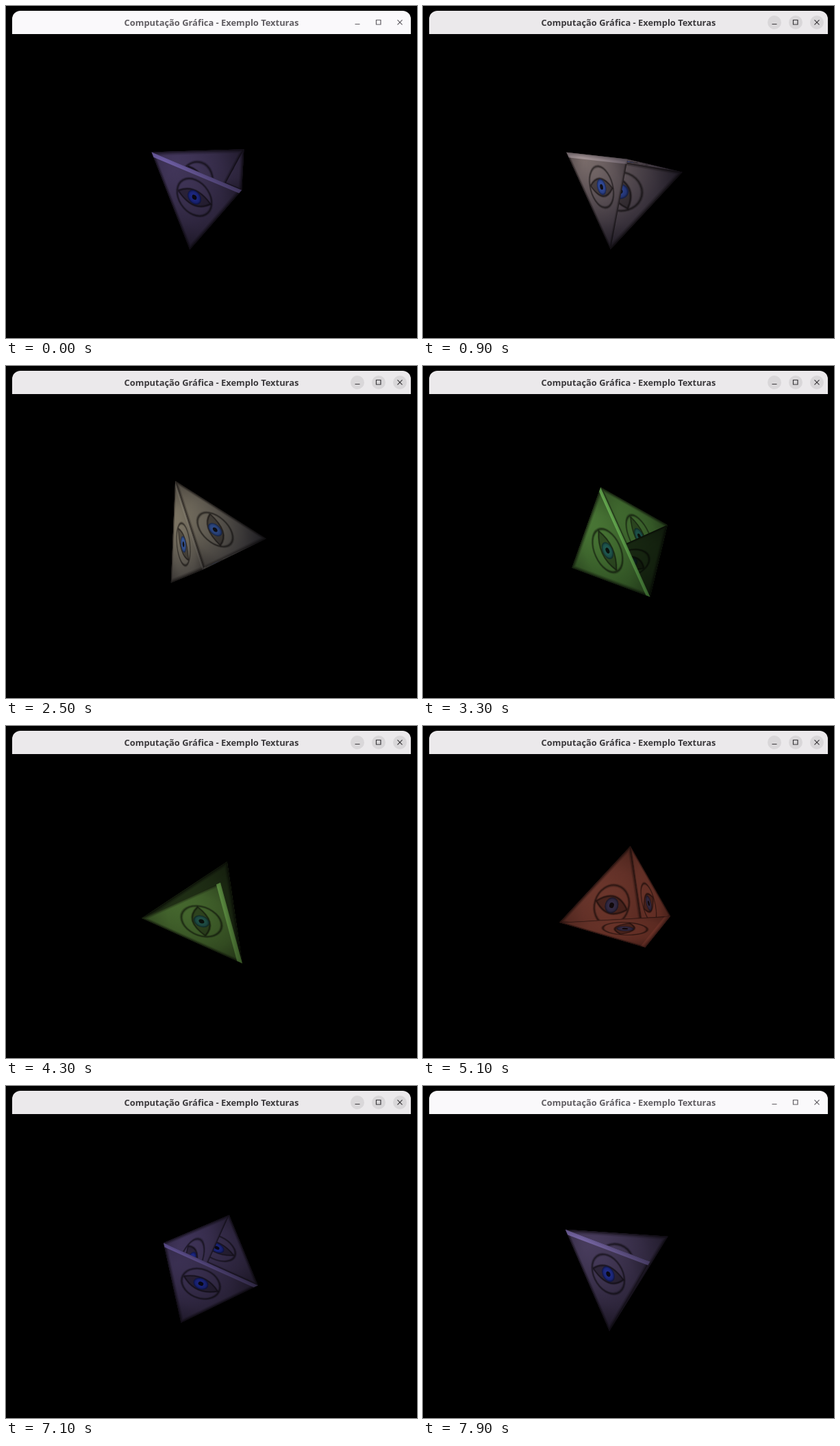
These frames come from a looping animation (600 by 485 pixels, 8000 ms). An HTML page with a canvas:

```html
<!DOCTYPE html>
<html lang="pt">
<head>
<meta charset="utf-8">
<title>Computação Gráfica - Exemplo Texturas</title>
<style>
  html, body { margin: 0; width: 100%; height: 100%; overflow: hidden; background: #000; }
  canvas { position: absolute; left: 0; top: 0; }
  #bar {
    position: absolute; left: 9px; top: 7px; width: 582px; height: 34px;
    border-radius: 12px 12px 0 0; background: #ebe9eb; color: #3b393c;
    font: bold 12.9px/34px "Noto Sans", "Open Sans", sans-serif;
    text-align: center; white-space: nowrap;
  }
  #bar.idle { background: #faf9fb; color: #615e63; }
  #bar svg { position: absolute; left: 0; top: 0; }
  #bar circle { fill: #d9d7d9; }
  #bar.idle circle { fill: none; }
  #bar path { fill: none; stroke: currentColor; stroke-width: 1.2; }
</style>
</head>
<body>
<canvas id="view" width="600" height="485"></canvas>
<div id="bar" class="idle">Computação Gráfica - Exemplo Texturas
  <svg width="582" height="34">
    <circle cx="504" cy="17" r="10"/><circle cx="535" cy="17" r="10"/><circle cx="566" cy="17" r="10"/>
    <path d="M500.5 19.5h7M531.5 13.5h6.5v6.5h-6.5zM562.5 13.3l7 7m0-7l-7 7"/>
  </svg>
</div>
<script>
const LOOP = 8000, STEP = 100, FOCUS_IN = 300, FOCUS_OUT = 7600;
const START_TURN = 91, TURN_RATE = 47.1; // degrees, degrees per second
const CENTRE = { x: 297.25, y: 257.75 }, DISTANCE = 840;
const ctx = document.getElementById('view').getContext('2d');
const bar = document.getElementById('bar');
const rad = deg => deg * Math.PI / 180;

// Tetrahedron, y up, z towards the viewer: three base corners, then the top
const SOLID = [-90, 150, 30].map(a => [93.8 * Math.cos(rad(a)), -41.7, 93.8 * Math.sin(rad(a))]);
SOLID.push([0, 91, 0]);
// Painted in this order without a depth test: apex, base left, base right
const FACES = [[3, 1, 2], [3, 2, 0], [3, 0, 1], [1, 0, 2]];

// Each lamp rules around one angle of the turn
const LAMPS = [
  { at: 60, width: 50, near: [124, 108, 192], far: [58, 50, 84] },
  { at: 170, width: 40, near: [255, 242, 222], far: [46, 42, 72] },
  { at: 270, width: 35, near: [132, 234, 104], far: [70, 132, 56] },
  { at: 331, width: 23, near: [208, 104, 88], far: [166, 72, 58] }
];
const GREEN = 2;

// Spin about the (1, 1, 0) diagonal, then perspective
function project([x, y, z], turn) {
  const c = Math.cos(rad(turn)), s = Math.sin(rad(turn));
  const h = (x + y) / 2, p = (x - y) / 2;
  const q = p * c + z * s * Math.SQRT1_2;
  const depth = z * c - p * s * Math.SQRT2;
  const k = DISTANCE / (DISTANCE - depth);
  return { x: CENTRE.x + (h + q) * k, y: CENTRE.y + (q - h) * k };
}

function lampWeights(turn) {
  const raw = LAMPS.map(({ at, width }) => {
    const gap = Math.abs((turn - at) % 360);
    return Math.exp(-((Math.min(gap, 360 - gap) / width) ** 2));
  });
  const sum = raw.reduce((a, b) => a + b);
  return raw.map(w => w / sum);
}

function blend(weights, end) {
  const rgb = [0, 1, 2].map(i => LAMPS.reduce((v, lamp, n) => v + lamp[end][i] * weights[n], 0));
  return `rgb(${rgb})`;
}

function disc(r, fill) {
  ctx.beginPath();
  ctx.arc(0, 0, r, 0, 7);
  ctx.fillStyle = fill;
  ctx.fill();
}

function triangle() {
  ctx.beginPath();
  ctx.moveTo(0, -100);
  ctx.lineTo(-86.6, 50);
  ctx.lineTo(86.6, 50);
  ctx.closePath();
}

// A soft dark line: faint wide strokes under narrow ones
function softStroke(width, alpha) {
  for (let i = 3; i; i--) {
    ctx.lineWidth = width * i / 2;
    ctx.strokeStyle = `rgba(26,20,20,${alpha / i})`;
    ctx.stroke();
  }
}

function eye() {
  ctx.beginPath();
  ctx.arc(0, 0, 33, 0, 7);
  softStroke(4, .45);
  ctx.beginPath();
  ctx.moveTo(-31, 0);
  ctx.quadraticCurveTo(0, -30, 31, 0);
  ctx.quadraticCurveTo(0, 27, -31, 0);
  ctx.fillStyle = 'rgba(45,38,38,.45)';
  ctx.fill();
  softStroke(3, .5);
  const iris = ctx.createRadialGradient(0, 0, 4, 0, 0, 13);
  iris.addColorStop(0, '#4c78e4');
  iris.addColorStop(.6, '#4168cc');
  iris.addColorStop(1, '#22356c');
  disc(13, iris);
  disc(4.5, '#181824');
}

function face(a, b, c, shade, rim) {
  const mx = (a.x + b.x + c.x) / 3, my = (a.y + b.y + c.y) / 3;
  ctx.save();
  ctx.transform((c.x - b.x) / 173.2, (c.y - b.y) / 173.2,
    (mx - a.x) / 100, (my - a.y) / 100, mx, my);
  triangle();
  ctx.clip();
  const stone = ctx.createRadialGradient(0, 0, 10, 0, 0, 100);
  stone.addColorStop(0, '#968e89');
  stone.addColorStop(.5, '#8b837f');
  stone.addColorStop(1, '#6c6563');
  ctx.fillStyle = stone;
  ctx.fillRect(-90, -101, 180, 152);
  triangle();
  softStroke(7, .5);
  eye();
  ctx.fillStyle = `rgba(255,250,255,${rim})`;
  ctx.fillRect(-90, 42, 180, 9);
  ctx.fillStyle = `rgba(0,0,0,${1 - shade})`;
  ctx.fillRect(-90, -101, 180, 152);
  ctx.restore();
}

function draw(t) {
  const turn = START_TURN + TURN_RATE * t / 1000;
  const weights = lampWeights(turn);
  const pts = SOLID.map(v => project(v, turn));
  const rim = .75 * Math.sin(rad(turn)) ** 2;
  const third = 1 - .62 * weights[GREEN];

  ctx.fillStyle = '#000';
  ctx.fillRect(0, 0, 600, 485);
  FACES.forEach((ids, n) =>
    face(...ids.map(i => pts[i]), n === 2 ? third : 1, n === 3 ? rim : 0));

  // Coloured light over the whole solid
  const light = ctx.createRadialGradient(232, 220, 0, 232, 220, 165);
  light.addColorStop(0, blend(weights, 'near'));
  light.addColorStop(1, blend(weights, 'far'));
  ctx.globalCompositeOperation = 'multiply';
  ctx.fillStyle = light;
  ctx.fillRect(0, 0, 600, 485);
  ctx.globalCompositeOperation = 'source-over';

  bar.classList.toggle('idle', t < FOCUS_IN || t >= FOCUS_OUT);
}

const start = performance.now();
function tick() {
  const t = (performance.now() - start) % LOOP;
  draw(Math.floor(t / STEP) * STEP);
  requestAnimationFrame(tick);
}
tick();
</script>
</body>
</html>
```
